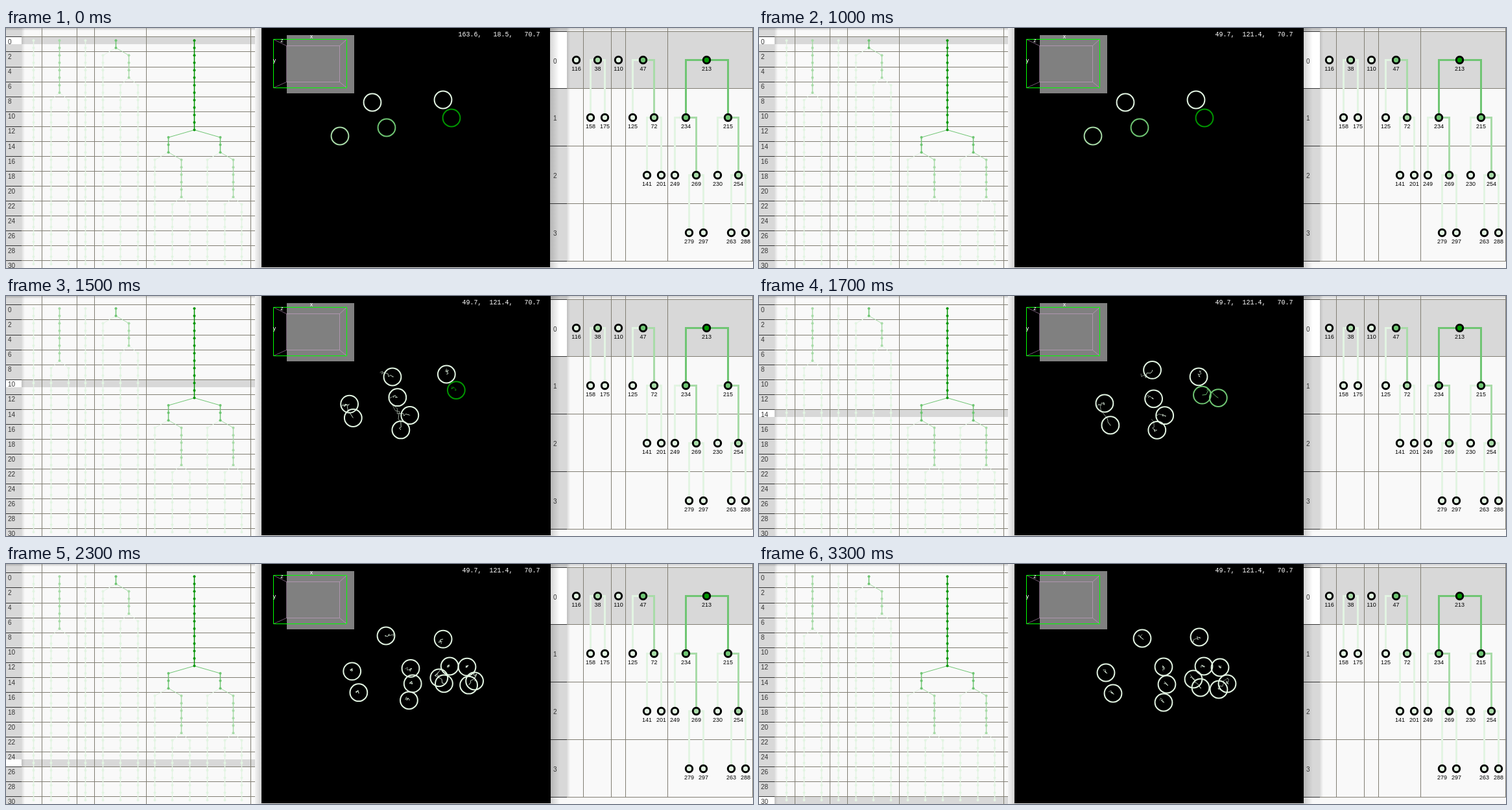
An HTML page with a canvas for the animation above (3400 ms loop, 1152x371 px).

```html
<!DOCTYPE html>
<html lang="en">
<head>
<meta charset="utf-8">
<title>Cell lineage tracks</title>
<style>
  html, body { margin: 0; width: 100%; height: 100%; overflow: hidden; background: #f3f3f3; }
  canvas { display: block; width: 100%; height: 100%; }
</style>
</head>
<body>
<canvas id="stage" width="1152" height="371"></canvas>
<script>
const ctx = document.getElementById('stage').getContext('2d');
const LOOP = 3400, STEP = 100, LAST_ROW = 30, TRAIL = 8;
const SANS = '"Liberation Sans", Arial, sans-serif';
const MONO = '"Liberation Mono", "Courier New", monospace';
const LINE = '#817e73', SHADE = '#d8d8d8', PAPER = '#f9f9f9';

const point = (x, y) => ({ x, y });
const mix = (a, b, f) => a + (b - a) * f;
const clamp = v => Math.min(1, Math.max(0, v));
const easeOut = f => 1 - (1 - f) ** 2;

// A cell lives until row `last`, then divides into its children.
// Its waypoints are spread evenly over its life.
const cell = (id, last, waypoints, ...children) => ({ id, last, waypoints, children });

const family116 = cell(116, LAST_ROW, [point(565, 115), point(582, 119), point(596, 125),
  point(607, 114), point(596, 109), point(586, 111), point(591, 115)]);
const family38 = cell(38, 7, [point(515, 167), point(524, 169)],
  cell(158, LAST_ROW, [point(542, 200), point(541, 197), point(546, 200)]),
  cell(175, LAST_ROW, [point(533, 166), point(532, 163), point(535, 168)]));
const family110 = cell(110, LAST_ROW, [point(674, 111), point(681, 116), point(678, 125),
  point(668, 120), point(679, 113)]);
const family47 = cell(47, 1, [point(587, 154), point(589, 157)],
  cell(125, LAST_ROW, [point(600, 155), point(609, 159), point(624, 164), point(624, 159)]),
  cell(72, 5, [point(606, 182)],
    cell(141, LAST_ROW, [point(626, 185), point(624, 183), point(629, 186)]),
    cell(201, LAST_ROW, [point(609, 208), point(616, 207), point(620, 209), point(624, 214)])));
const family213 = cell(213, 12, [point(687, 139), point(689, 142), point(695, 146)],
  cell(234, 15, [point(682, 154)],
    cell(249, LAST_ROW, [point(682, 158), point(686, 158)]),
    cell(269, 21, [point(663, 171)],
      cell(279, LAST_ROW, [point(670, 178)]),
      cell(297, LAST_ROW, [point(681, 191)]))),
  cell(215, 15, [point(710, 159)],
    cell(230, LAST_ROW, [point(711, 158), point(711, 160)]),
    cell(254, 21, [point(724, 172)],
      cell(263, LAST_ROW, [point(722, 185)]),
      cell(288, LAST_ROW, [point(709, 194)]))));

const cells = [], familyEnds = [];
let leafCount = 0;

// Leaves take consecutive slots; parents sit midway between their children.
function place(c, parent) {
  c.parent = parent;
  c.depth = parent ? parent.depth + 1 : 0;
  c.first = parent ? parent.last + 1 : 0;
  c.origin = parent ? parent.last : 0;
  if (parent) c.waypoints.unshift(parent.waypoints.at(-1));
  cells.push(c);
  c.children.forEach(child => place(child, c));
  const total = key => c.children.reduce((sum, child) => sum + child[key], 0);
  const parted = c.children.length > 0;
  c.leaves = parted ? total('leaves') : 1;
  c.slot = parted ? total('slot') / c.children.length : leafCount++;
  c.color = ['#e2f4e2', '#a8dba8', '#6fc573', '#009600'][Math.min(c.leaves, 4) - 1];
}
for (const family of [family116, family38, family110, family47, family213]) {
  place(family);
  familyEnds.push(leafCount - 0.5);
}

// Position at a row, following the ancestors for rows before the cell's birth.
function position(c, row) {
  if (row < c.first && c.parent) return position(c.parent, row);
  const legs = c.waypoints.length - 1;
  const at = (row - c.origin) / (c.last - c.origin) * legs;
  const leg = Math.min(legs - 1, Math.floor(at));
  const a = c.waypoints[leg], b = c.waypoints[leg + 1], f = easeOut(at - leg);
  return [mix(a.x, b.x, f), mix(a.y, b.y, f)];
}

function wobble([x, y], row, seed) {
  return [x + 2 * Math.sin(row * 1.9 + seed), y + 2 * Math.cos(row * 2.3 + seed)];
}

const leftX = slot => Math.round(42 + 26.78 * slot);
const leftTop = row => Math.floor(13.9 + 11.53 * row);
const leftY = row => 19.2 + 11.53 * row;
const rightX = slot => Math.round(879 + 21.75 * slot);
const rightY = depth => 49.5 + 89 * depth;

function rect(x, y, w, h, fill) {
  ctx.fillStyle = fill;
  ctx.fillRect(x, y, w, h);
}

function path(points, color, width = 1) {
  ctx.beginPath();
  points.forEach(p => ctx.lineTo(...p));
  ctx.strokeStyle = color;
  ctx.lineWidth = width;
  ctx.stroke();
}

function disc(x, y, r, fill, stroke, width) {
  ctx.beginPath();
  ctx.arc(x, y, r, 0, 7);
  if (fill) { ctx.fillStyle = fill; ctx.fill(); }
  if (stroke) { ctx.strokeStyle = stroke; ctx.lineWidth = width; ctx.stroke(); }
}

function text(str, x, y, font, color, align = 'left') {
  ctx.font = font;
  ctx.fillStyle = color;
  ctx.textAlign = align;
  ctx.fillText(str, x, y);
}

function shadow(x, y, w, h, strength, vertical) {
  const g = ctx.createLinearGradient(x, y, vertical ? x : x + w, vertical ? y + h : y);
  g.addColorStop(0, `rgba(0,0,0,${strength})`);
  g.addColorStop(1, 'rgba(0,0,0,0)');
  rect(x, y, w, h, g);
}

const hLine = (x1, x2, y, color = LINE) => rect(x1, y, x2 - x1, 1, color);
const vLine = (x, height) => rect(x, 0, 1, height, LINE);

function drawLeft(row) {
  rect(0, 0, 384, 371, PAPER);
  rect(0, 0, 24, 371, SHADE);
  rect(24, leftTop(row), 360, 12, SHADE);
  rect(0, leftTop(row), 24, 12, '#fff');
  shadow(24, 0, 5, 371, 0.12);
  shadow(0, 0, 384, 4, 0.2, true);
  familyEnds.forEach(slot => vLine(leftX(slot), 371));
  for (let r = 0; r <= LAST_ROW; r += 2) {
    hLine(24, 384, leftTop(r));
    hLine(0, 24, leftTop(r), '#333');
    text(r, 3, 25 + 11.54 * r, '10px ' + SANS, '#333');
  }
  for (const c of cells) {
    const x = leftX(c.slot) + 0.5;
    for (const child of c.children)
      path([[x, leftY(c.last)], [leftX(child.slot) + 0.5, leftY(child.first)]], child.color);
    path([[x, leftY(c.first)], [x, leftY(c.last)]], c.color, 1.5);
    for (let r = c.first; r <= c.last; r++) disc(x, leftY(r), 2, c.color);
  }
  shadow(384, 0, 10, 371, 0);
  ctx.save();
  ctx.translate(394, 0);
  ctx.scale(-1, 1);
  shadow(0, 0, 10, 371, 0.14);
  ctx.restore();
}

function drawVolume() {
  rect(433, 11, 104, 90, '#808080');
  const box = (l, t, r, b) => [[l, t], [r, t], [r, b], [l, b]].map(p => p.map(v => v + 0.5));
  const outer = box(412, 17, 525, 92), inner = box(432, 27, 514, 83);
  const faint = 'rgba(220,170,220,.5)';
  outer.forEach((corner, i) => path([corner, inner[i]], faint));
  path([...inner, inner[0]], faint);
  path([...outer, outer[0]], '#00ff00');
  const axis = (name, x, y) => text(name, x, y, '9px ' + SANS, '#fff', 'center');
  axis('x', 471, 16);
  axis('y', 414, 53);
  axis('z', 425.5, 22);
}

function drawScene(row, cursor, edge) {
  rect(394, 0, edge - 394, 370, '#000');
  drawVolume();
  const label = cursor.map(v => v.toFixed(1).padStart(7)).join(',');
  text(label.trim(), 823.5, 13, '10px ' + MONO, '#fff', 'right');
  for (const c of cells) {
    if (row < c.first || row > c.last) continue;
    const trailPoint = r => r < row ? wobble(position(c, r), r, c.id) : position(c, r);
    for (let age = Math.min(TRAIL, row); age > 0; age--) {
      ctx.globalAlpha = 1 - 0.5 * age / TRAIL;
      path([trailPoint(row - age), trailPoint(row - age + 1)], c.color);
    }
    ctx.globalAlpha = 1;
    disc(...position(c, row), 13.4, null, c.color, 2);
  }
}

function drawRight(edge) {
  rect(edge, 0, 1152 - edge, 371, PAPER);
  rect(edge, 0, 865 - edge, 360, SHADE);
  rect(865, 6, 287, 87, SHADE);
  rect(edge, 6, 865 - edge, 87, '#fff');
  shadow(edge, 0, 14, 371, 0.16);
  shadow(865, 0, 5, 360, 0.12);
  shadow(edge, 0, 1152 - edge, 6, 0.16, true);
  familyEnds.forEach(slot => vLine(rightX(slot), 361));
  for (let depth = 0; depth < 5; depth++) {
    const y = Math.max(5, 4 + 89 * depth);
    hLine(865, 1152, y);
    hLine(edge, 865, y, '#333');
    if (depth < 4) text(depth, 844, y + 50, '10px ' + SANS, '#333');
  }
  const spot = c => [rightX(c.slot) + 0.5, rightY(c.depth)];
  for (const c of cells)
    for (const child of c.children)
      path([spot(c), [spot(child)[0], spot(c)[1]], spot(child)], child.color, 3);
  for (const c of cells) {
    const [x, y] = spot(c);
    disc(x, y, 5.2, c.color, '#000', 3);
    text(c.id, x, y + 16.5, '9px ' + SANS, '#000', 'center');
  }
}

// The scan starts after 1 s and slows down a little towards the last row.
function scanRow(t) {
  const f = clamp((t - 1000) / 1600);
  return Math.round(LAST_ROW * mix(f, easeOut(f), 0.15));
}

function frame() {
  const t = Math.floor(performance.now() % LOOP / STEP) * STEP;
  const move = clamp((t - 100) / 300);
  const edge = t < 1000 ? 839 : 840;
  rect(0, 0, 1152, 371, '#f3f3f3');
  drawLeft(scanRow(t));
  drawScene(scanRow(t), [mix(163.6, 49.7, move), mix(18.5, 121.4, move), 70.7], edge);
  drawRight(edge);
  requestAnimationFrame(frame);
}
frame();
</script>
</body>
</html>
```
